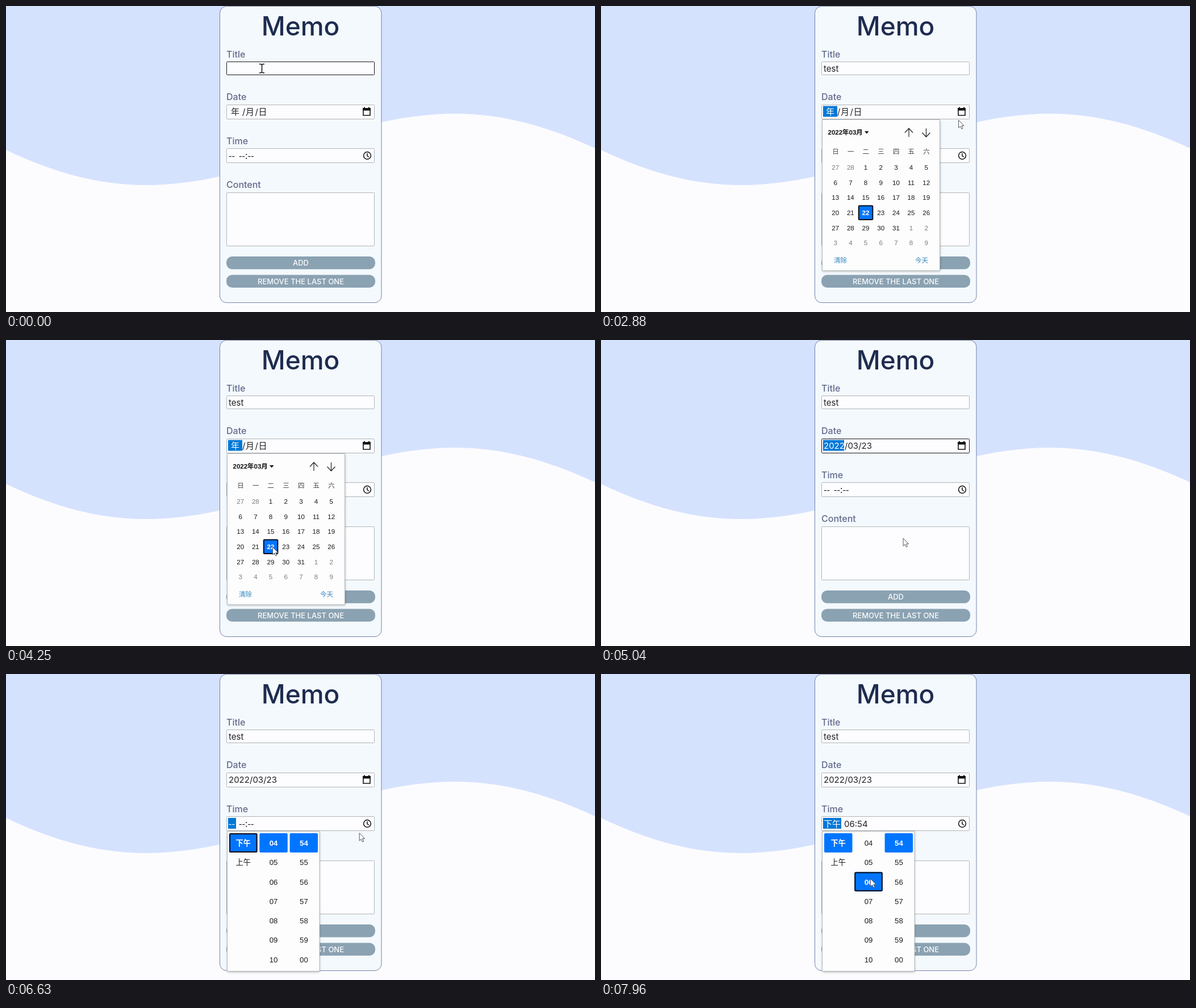
Recreate the animation shown at these times as an HTML page with a canvas. Size 1037 by 540 pixels, loop 8 s.

```html
<!DOCTYPE html>
<html lang="en">
<head>
<meta charset="utf-8">
<title>Memo</title>
<style>
  html, body { margin: 0; width: 100%; height: 100%; overflow: hidden; background: #fcfcfe; }
  canvas { display: block; }
</style>
</head>
<body>
<canvas id="stage" width="1037" height="540"></canvas>
<script>
const ctx = document.getElementById('stage').getContext('2d');
const LOOP = 8000;
const CJK = '"Noto Sans CJK TC", "Noto Sans CJK JP", "Noto Sans CJK SC", "Noto Sans CJK", sans-serif';
const UI = 'Inter, ' + CJK;
const POPUP = '"Liberation Sans", ' + CJK;
const DASH = '"Open Sans", ' + CJK;
const BLUE = '#0075ff', HOVER = '#b0d6ff', MARK = '#0078d7', INK = '#222226';

// Moments (ms) at which the form changes state
const T = { typed: [830, 920, 1000, 1420], dateFocus: 2580, dateOpen: 2750, datePick: 4790,
            timeFocus: 5900, timeOpen: 6080, hourPick: 7790 };

// Pointer stops: time, x, y
const stops = [[0, 450, 110], [1950, 450, 110], [2560, 636, 191], [2740, 636, 191],
  [3330, 588, 260], [3540, 574, 285], [4250, 469, 365], [4430, 469, 365], [4590, 499, 372],
  [4800, 499, 372], [5570, 639, 275], [6510, 639, 275], [7170, 444, 334], [7400, 445, 336],
  [7740, 474, 361], [LOOP, 474, 361]];

function pointerAt(t) {
  const i = stops.findIndex(s => s[0] > t);
  const [t0, x0, y0] = stops[i - 1], [t1, x1, y1] = stops[i];
  const u = (t - t0) / (t1 - t0), k = u * u * (3 - 2 * u);
  return { x: x0 + (x1 - x0) * k, y: y0 + (y1 - y0) * k };
}

function box(x, y, w, h, fill, stroke, r = 0, line = 1) {
  ctx.beginPath();
  ctx.roundRect(x, y, w, h, r);
  if (fill) { ctx.fillStyle = fill; ctx.fill(); }
  if (stroke) { ctx.strokeStyle = stroke; ctx.lineWidth = line; ctx.stroke(); }
}

function text(str, x, y, size, color = INK, align = 'left', family = UI, weight = 400) {
  ctx.font = `${weight} ${size}px ${family}`;
  ctx.fillStyle = color;
  ctx.textAlign = align;
  ctx.fillText(str, x, y);
}

function path(d, stroke, width, fill) {
  const p = new Path2D(d);
  if (fill) { ctx.fillStyle = fill; ctx.fill(p); }
  if (stroke) { ctx.strokeStyle = stroke; ctx.lineWidth = width; ctx.stroke(p); }
}

function background() {
  ctx.fillStyle = '#fcfcfe';
  ctx.fillRect(0, 0, 1037, 540);
  path('M0 0V254C86 295 165 316 246 316C350 316 450 284 518.5 253C587 222 687 190 791 190C872 190 951 211 1037 251V0Z',
    null, 0, '#d5e2fe');
}

function field(y, h, focused) {
  box(388.5, y + .5, 260, h, '#fdfcfe', focused ? '#18181c' : '#b2b4b8', 1);
}

function marked(str, x, y, w, on, size, family, weight) {
  if (on) box(391, y - 15.5, w, 19, MARK);
  text(str, x, y, size, on ? '#fff' : INK, 'left', family, weight);
}

function form(t) {
  box(376.5, .5, 284.5, 523, '#f4f9fd', '#7482ab', 12);
  text('Memo', 518.5, 52, 46, '#1f2c50', 'center', UI, 500);
  [['Title', 91], ['Date', 166], ['Time', 244], ['Content', 321]]
    .forEach(([label, y]) => text(label, 388, y, 16, '#626a8b', 'left', UI, 500));

  field(98, 23, t < T.dateFocus);
  text('test'.slice(0, T.typed.filter(k => t >= k).length), 392, 116, 15);

  const dateActive = t >= T.dateFocus && t < T.timeFocus;
  const calendarOpen = t >= T.dateOpen && t < T.datePick;
  field(174, 25, dateActive && !calendarOpen);
  if (t < T.datePick) {
    marked('年', 396, 192, 25, dateActive, 15, CJK, 300);
    [['/', 416], ['月', 422], ['/', 438.5], ['日', 444.5]]
      .forEach(([s, x]) => text(s, x, 192, 15, INK, 'left', s === '/' ? UI : CJK, s === '/' ? 400 : 300));
  } else {
    marked('2022', 392, 192, 37, dateActive, 15);
    text('/03/23', 429, 192, 15);
  }
  path('M629 182H641V193H629Z', '#111', 1.6);
  path('M628 180H642V184.5H628ZM630 178.5H632V181H630ZM638 178.5H640V181H638Z', null, 0, '#111');

  const timeActive = t >= T.timeFocus;
  field(251, 25, timeActive && t < T.timeOpen);
  if (t < T.hourPick) {
    marked('--', 392, 269.5, 14, timeActive, 17, DASH);
    text('--:--', 410, 269.5, 17, INK, 'left', DASH);
  } else {
    marked('下午', 392, 269.5, 32, true, 15, CJK, 300);
    text('06:54', 428, 269.5, 15);
  }
  path('M642.4 264A6.4 6.4 0 1 1 629.6 264A6.4 6.4 0 1 1 642.4 264M636 260V264.5L639 266.5', '#111', 1.5);

  field(329, 94, false);
  [['ADD', 442, 458], ['REMOVE THE LAST ONE', 474.5, 490.5]].forEach(([label, y, base]) => {
    box(388, y, 262, 22.5, '#8ba2b2', null, 10);
    text(label, 519, base, 13, '#fafcfe', 'center', UI, 500);
  });
}

function panel(x, y, w, h) {
  ctx.save();
  ctx.shadowColor = 'rgba(0,0,0,.3)';
  ctx.shadowBlur = 4;
  ctx.shadowOffsetY = 1;
  box(x, y, w, h, '#fdfdfe');
  ctx.restore();
  box(x, y, w, h, null, '#b3b9b9');
}

function calendar(p) {
  panel(389.5, 200.5, 207, 266.5);
  text('2022年03月', 399.5, 227, 11.5, '#111', 'left', POPUP, 700);
  path('M464 221H471.5L467.75 225.5Z', null, 0, '#111');
  path('M542 231V216.5M535 223.5L542 216L549 223.5M572.5 216V230.5M565.5 223.5L572.5 231L579.5 223.5', '#222', 1.2);

  const step = 26.67;
  [...'日一二三四五六'].forEach((s, i) => text(s, 413 + i * step, 261, 11.5, '#444', 'center', POPUP));
  for (let i = 0; i < 42; i++) {
    const x = 412.7 + i % 7 * step, y = 284.7 + Math.floor(i / 7) * step;
    const day = i < 2 ? 27 + i : (i - 2) % 31 + 1;
    const inMonth = i > 1 && i < 33, selected = inMonth && day === 22;
    const over = Math.abs(p.x - x) < step / 2 && Math.abs(p.y - y) < step / 2;
    if (selected) box(x - 12.3, y - 12.3, 24.6, 24.6, BLUE, '#080c14', 1.5, 2);
    else if (over) box(x - 13, y - 13, 26, 26, HOVER, null, 2);
    text(day, x, y + 4.2, 11.6, selected ? '#fff' : inMonth ? '#161616' : '#7b7b7b', 'center', POPUP, selected ? 700 : 400);
  }
  text('清除', 410, 453, 11.5, '#3186bb', 'left', POPUP);
  text('今天', 553, 453, 11.5, '#3186bb', 'left', POPUP);
}

function clockList(t, p) {
  panel(389.5, 277.5, 162.5, 247);
  const picked = t >= T.hourPick, pad = n => String(n).padStart(2, '0');
  const rows = [0, 1, 2, 3, 4, 5, 6], step = 34.25;
  const columns = [
    { items: ['下午', '上午'], chosen: 0 },
    { items: rows.map(r => pad(4 + r)), chosen: picked ? 2 : 0 },
    { items: rows.map(r => pad((54 + r) % 60)), chosen: 0 }
  ];
  columns.forEach(({ items, chosen }, c) => items.forEach((label, r) => {
    const x = 393 + c * 53.3, y = 281 + r * step;
    const selected = r === chosen;
    const over = p.x >= x - 2.5 && p.x < x + 50.8 && p.y >= y && p.y < y + step;
    if (selected || over) box(x, y, 49.5, 34, selected ? BLUE : HOVER, null, 2);
    if (selected && c === (picked ? 1 : 0)) box(x + 1, y + 1, 47.5, 32, null, '#080c14', 1.5, 2);
    text(label, x + 24.8, y + 22, 13.2, selected ? '#fff' : '#1c1c1c', 'center', POPUP, selected ? 700 : c ? 400 : 300);
  }));
}

function pointer({ x, y }) {
  ctx.save();
  ctx.translate(x, y);
  if (y < 122) {
    path('M-4 -7.5H-1.5L.5 -6.5L2.5 -7.5H5M-4 8H-1.5L.5 7L2.5 8H5M.5 -6.5V7', '#111', 1.5);
  } else {
    path('M.5 .5V14L3.6 11.2L5.8 16L8 15L5.8 10.4H10Z', '#55565c', 1, '#fff');
  }
  ctx.restore();
}

function draw(now) {
  const t = now % LOOP, p = pointerAt(t);
  background();
  form(t);
  if (t >= T.dateOpen && t < T.datePick) calendar(p);
  if (t >= T.timeOpen) clockList(t, p);
  pointer(p);
}

const start = performance.now();
(function tick() {
  draw(performance.now() - start);
  requestAnimationFrame(tick);
})();
</script>
</body>
</html>
```
